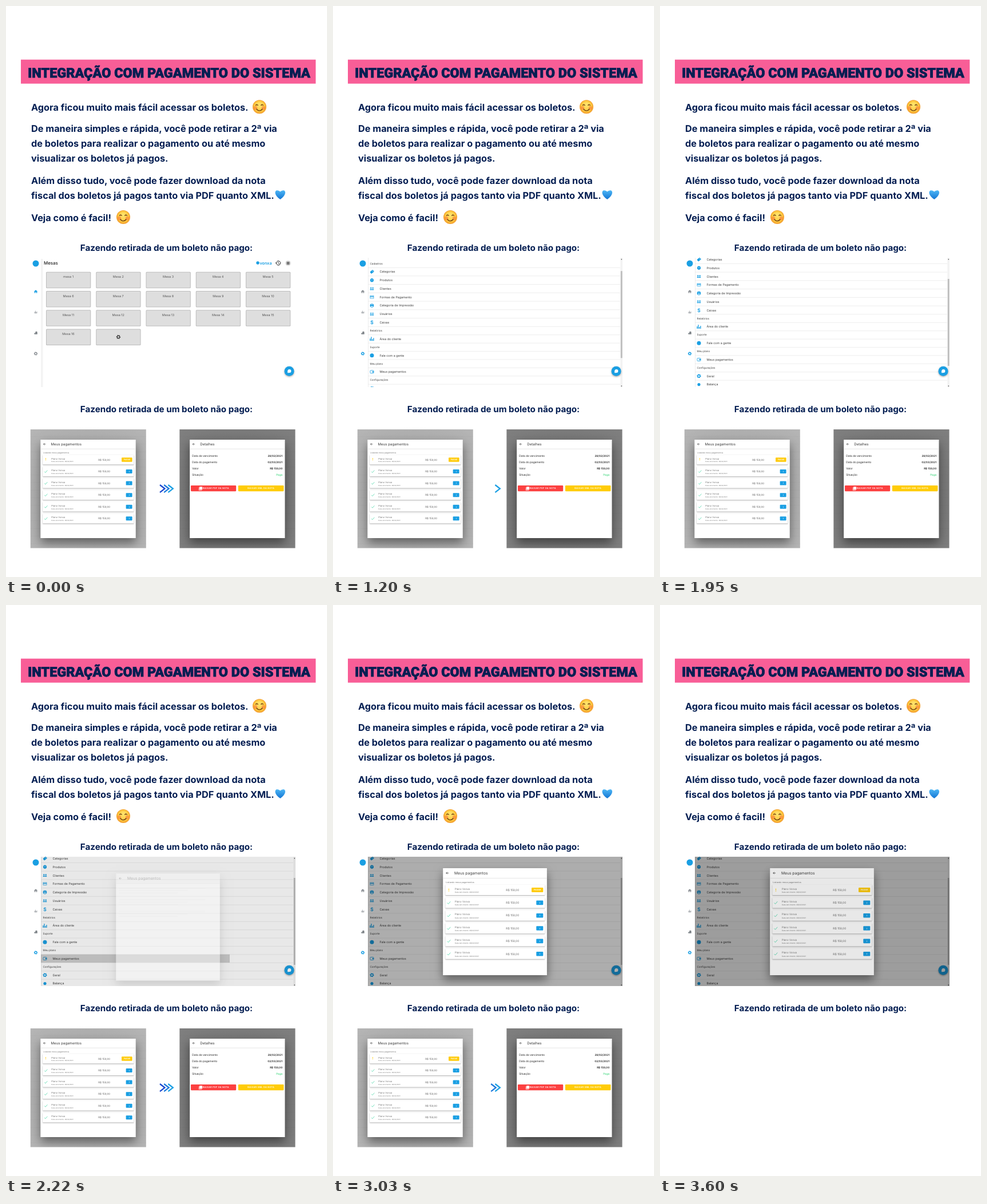
An HTML page with a canvas that plays this animation: 561x998 px, repeating every 3.63 s.

```html
<!DOCTYPE html>
<html lang="pt-BR">
<head>
<meta charset="utf-8">
<title>Integração com pagamento</title>
<style>
html, body { margin: 0; width: 100%; height: 100%; overflow: hidden; background: #fff; }
canvas, svg { position: absolute; left: 0; top: 0; width: 561px; height: 998px; }
text { fill: #041e52; font: 700 16.3px Inter, sans-serif; text-rendering: geometricPrecision; }
.title { font: 900 23.4px Roboto, sans-serif; text-anchor: middle; stroke: #041e52; stroke-width: 0.8px; }
.sub { font-size: 15.2px; text-anchor: middle; }
</style>
</head>
<body>
<canvas id="stage"></canvas>
<svg viewBox="0 0 561 998">
  <rect x="26" y="93.7" width="515.3" height="42" fill="#f85e97"/>
  <text class="title" x="285" y="125">INTEGRAÇÃO COM PAGAMENTO DO SISTEMA</text>
  <text x="44" y="182.5">Agora ficou muito mais fácil acessar os boletos.</text>
  <text x="44" y="219.5">De maneira simples e rápida, você pode retirar a 2ª via</text>
  <text x="44" y="245.5">de boletos para realizar o pagamento ou até mesmo</text>
  <text x="44" y="271.5">visualizar os boletos já pagos.</text>
  <text x="44" y="310.5">Além disso tudo, você pode fazer download da nota</text>
  <text x="44" y="336.5">fiscal dos boletos já pagos tanto via PDF quanto XML.</text>
  <text x="44" y="375.5">Veja como é facil!</text>
  <text class="sub" x="280.5" y="428">Fazendo retirada de um boleto não pago:</text>
  <text class="sub" x="280.5" y="710">Fazendo retirada de um boleto não pago:</text>
</svg>
<script>
const W = 561, H = 998, LOOP = 3630;
const BLUE = '#1a9fe3', INK = '#3a3a3a', GRAY = '#777', YELLOW = '#ffcb0b';
const canvas = document.getElementById('stage');
const c = canvas.getContext('2d');
const dpr = window.devicePixelRatio || 1;
canvas.width = W * dpr;
canvas.height = H * dpr;

const clamp = v => Math.max(0, Math.min(1, v));
const ramp = (t, from, to) => clamp((t - from) / (to - from));
const easeOut = p => 1 - (1 - p) ** 3;

// ---- drawing helpers ----
function group(draw) { c.save(); draw(); c.restore(); }

function rect(x, y, w, h, fill, r = 0) {
  c.fillStyle = fill;
  c.beginPath();
  c.roundRect(x, y, w, h, r);
  c.fill();
}

function dot(x, y, r, fill) {
  c.fillStyle = fill;
  c.beginPath();
  c.arc(x, y, r, 0, 7);
  c.fill();
}

function line(points, color, width = 1) {
  c.strokeStyle = color;
  c.lineWidth = width;
  c.beginPath();
  points.forEach(([x, y]) => c.lineTo(x, y));
  c.stroke();
}

function arc(x, y, r, a, b, color, width) {
  c.strokeStyle = color;
  c.lineWidth = width;
  c.beginPath();
  c.arc(x, y, r, a, b);
  c.stroke();
}

// y is the middle of the capitals
function label(s, x, y, size, color = INK, weight = 400, align = 'left') {
  c.font = `${weight} ${size}px Inter, sans-serif`;
  c.textAlign = align;
  c.fillStyle = color;
  c.fillText(s, x, y + size * 0.36);
}

function shadow(color, blur, dy) {
  c.shadowColor = color;
  c.shadowBlur = blur * dpr;
  c.shadowOffsetY = dy * dpr;
}

// ---- icons, centred on x, y ----
function gear(x, y, r, color) {
  c.fillStyle = color;
  c.beginPath();
  for (let i = 0; i < 24; i++) {
    const a = i * Math.PI / 12, d = i % 4 < 2 ? r : r * 0.76;
    c.lineTo(x + d * Math.cos(a), y + d * Math.sin(a));
  }
  c.closePath();
  c.moveTo(x + r * 0.38, y);
  c.arc(x, y, r * 0.38, 0, 7);
  c.fill('evenodd');
}

function home(x, y, color) {
  c.fillStyle = color;
  c.beginPath();
  [[-3.3, 0.3], [0, -2.8], [3.3, 0.3], [2.3, 0.3], [2.3, 2.8], [0.7, 2.8], [0.7, 0.8],
   [-0.7, 0.8], [-0.7, 2.8], [-2.3, 2.8], [-2.3, 0.3]].forEach(([a, b]) => c.lineTo(x + a, y + b));
  c.fill();
}

function bars(x, y, s, color) {
  [4, 7, 3, 5].forEach((h, i) => rect(x + (i * 2 - 3.7) * s, y + (3.5 - h) * s, 1.3 * s, h * s, color));
}

function people(x, y) {
  for (const dx of [-1.7, 1.7]) {
    dot(x + dx, y - 1.2, 1.2, BLUE);
    rect(x + dx - 1.7, y + 0.6, 3.3, 1.9, BLUE, 0.8);
  }
}

function card(x, y) {
  c.strokeStyle = BLUE;
  c.lineWidth = 0.7;
  c.strokeRect(x - 3, y - 2.3, 6, 4.6);
  rect(x - 3, y - 1.3, 6, 1.3, BLUE);
}

function tag(x, y) {
  group(() => {
    c.translate(x, y);
    c.rotate(-0.7);
    rect(-3, -2, 6.4, 4.2, BLUE, 1);
    dot(1.8, 0, 0.6, '#fff');
  });
}

function cube(x, y) {
  c.fillStyle = BLUE;
  c.beginPath();
  for (let i = 0; i < 6; i++) {
    const a = Math.PI / 6 + i * Math.PI / 3;
    c.lineTo(x + 3.5 * Math.cos(a), y + 3.5 * Math.sin(a));
  }
  c.fill();
  line([[x - 2, y - 1], [x, y], [x + 2, y - 1]], '#fff', 0.5);
}

function printer(x, y) {
  dot(x, y, 3.3, BLUE);
  rect(x - 1.6, y + 0.6, 3.2, 1.6, '#fff');
  rect(x - 1.6, y - 2.2, 3.2, 0.7, '#fff');
}

function wallet(x, y) {
  c.strokeStyle = BLUE;
  c.lineWidth = 0.8;
  c.beginPath();
  c.roundRect(x - 3, y - 2.5, 6, 5, 1);
  c.stroke();
  rect(x + 0.5, y - 1, 2.8, 2, BLUE);
}

function back(x, y) {
  line([[x + 2.2, y], [x - 2, y]], '#333', 0.7);
  line([[x, y - 2], [x - 2, y], [x, y + 2]], '#333', 0.7);
}

function smiley(x, y) {
  const g = c.createRadialGradient(x, y - 4, 2, x, y, 12);
  g.addColorStop(0, '#ffe26a');
  g.addColorStop(0.7, '#fdc93f');
  g.addColorStop(1, '#f2992b');
  dot(x, y, 12, g);
  for (const s of [-1, 1]) {
    dot(x + s * 7, y + 2, 3.2, 'rgba(250,110,60,.5)');
    arc(x + s * 4.6, y - 1.6, 2.1, Math.PI * 1.1, Math.PI * 1.9, '#6b3a12', 1.4);
  }
  arc(x, y + 0.8, 5.8, 0.45, Math.PI - 0.45, '#6b3a12', 1.4);
}

function heart(x, y) {
  const g = c.createLinearGradient(0, y - 8, 0, y + 8);
  g.addColorStop(0, '#4fb9f7');
  g.addColorStop(1, '#1577d4');
  c.fillStyle = g;
  c.beginPath();
  c.moveTo(x, y + 8.5);
  c.bezierCurveTo(x - 14, y - 1, x - 9, y - 12, x, y - 5);
  c.bezierCurveTo(x + 9, y - 12, x + 14, y - 1, x, y + 8.5);
  c.fill();
}

// ---- app screens ----
function sidebar(t) {
  const onMenu = t >= 1110;
  dot(52, 450, 5.5, BLUE);
  home(52, 499, onMenu ? '#8a8f94' : BLUE);
  bars(52, 535, 0.65, '#8a8f94');
  rect(49.2, 571.5, 5.8, 2.2, '#7d8388', 1);
  dot(53, 570.5, 1.8, '#7d8388');
  gear(52, 607.5, 3.3, onMenu ? BLUE : t < 360 ? '#8a8f94' : '#cfd3d6');
}

function tables() {
  rect(61, 442, 3.5, 224, '#f3f3f3');
  label('Mesas', 66, 449.5, 7.9, '#222', 500);
  dot(440, 449, 2.7, BLUE);
  label('vonxa', 443.5, 449, 7.2, BLUE, 600);
  arc(476, 449.3, 3.7, -2.6, 2.6, '#222', 1);
  line([[476, 447], [476, 449.6], [478, 450.6]], '#222', 0.8);
  c.fillStyle = '#222';
  c.beginPath();
  c.moveTo(470.5, 448.5);
  c.lineTo(474.3, 448.5);
  c.lineTo(472.4, 450.8);
  c.fill();
  dot(493, 449.5, 4.8, '#dcdcdc');
  rect(490.5, 447, 5, 5, '#777', 0.8);
  for (let i = 0; i < 17; i++) {
    const x = 70 + (i % 5) * 87.25, y = 464.7 + Math.floor(i / 5) * 33.25;
    rect(x, y, 78.3, 28.5, '#bdbdbd', 1.5);
    rect(x + 1, y + 1, 76.3, 26.5, '#dedede', 1);
    if (i < 16) label(`${i ? 'M' : 'm'}esa ${i + 1}`, x + 39, y + 8.7, 5.5, '#555', 400, 'center');
    else gear(x + 39.2, y + 14, 3.8, '#444');
  }
}

const menu = [
  ['Cadastros'], ['Categorias', tag], ['Produtos', cube], ['Clientes', people],
  ['Formas de Pagamento', card], ['Categoria de Impressão', printer], ['Usuários', people],
  ['Caixas', (x, y) => label('$', x, y, 8.5, BLUE, 600, 'center')],
  ['Relatórios'], ['Área do cliente', (x, y) => bars(x, y, 1, BLUE)],
  ['Suporte'], ['Fale com a gente', (x, y) => dot(x, y, 3.5, BLUE)],
  ['Meu plano'], ['Meus pagamentos', wallet],
  ['Configurações'], ['Geral', (x, y) => gear(x, y, 3.7, BLUE)],
  ['Balança', (x, y) => dot(x, y, 2.6, BLUE)]
];

function menuPage(t) {
  const scroll = 48.3 * easeOut(ramp(t, 1080, 1590));
  rect(61, 440, 445, 226, '#fff');
  rect(61, 440, 1.2, 226, '#efefef');
  group(() => {
    c.translate(0, -scroll);
    dot(75.5, 453.7, 9.8, '#12b5e4');
    label('#1730', 496, 447, 5.7, INK, 400, 'right');
    label('Dom Tarvelo', 478.5, 447, 5.7, INK, 600, 'right');
    label('00.123.456/0001-00', 496, 453, 4.7, '#555', 400, 'right');
    label('Logado como Usuário', 496, 459.2, 3.8, '#444', 600, 'right');
    let y = 477;
    menu.forEach(([name, icon], i) => {
      if (i) y += icon && menu[i - 1][1] ? 14.75 : 14.4;
      line([[61, y + 7.3], [502, y + 7.3]], '#e5e5e5', 0.7);
      if (icon) {
        icon(68, y);
        label(name, 81.5, y, 5.3);
      } else {
        label(name, 64.5, y, 4.6);
      }
      if (name === 'Meus pagamentos' && t > 2130 && t < 2610) {
        const right = Math.min(502, 118 + (t - 2130) * 3);
        rect(61, y - 7.3, right - 61, 14.4, `rgba(0,0,0,${0.22 * (1 - ramp(t, 2180, 2480))})`);
      }
    });
  });
  rect(502.3, 440, 3.7, 226, '#f3f3f3');
  rect(502.8, 446 + scroll * 0.64, 2.8, 152, '#bdbdbd');
  rect(503.6, 442, 1.4, 1.4, '#555');
  rect(503.6, 663.5, 1.4, 1.4, '#555');
}

function fab() {
  group(() => {
    shadow('rgba(0,0,0,.35)', 3, 1.2);
    dot(495, 638.3, 8.5, BLUE);
  });
  dot(495.3, 638, 3.1, '#fff');
  rect(492, 638, 3, 3.2, '#fff', 0.8);
}

// ---- modal contents, drawn from a 0,0 corner ----
function modalFrame(title) {
  // the shadow falls only outside the box, so a fading modal stays clean
  group(() => {
    c.beginPath();
    c.rect(-100, -100, 400, 400);
    c.rect(0, 0, 181.5, 187);
    c.clip('evenodd');
    shadow('rgba(0,0,0,.45)', 16, 8);
    rect(0, 0, 181.5, 187, '#fff');
  });
  rect(0, 0, 181.5, 187, '#fff');
  rect(0, 17.2, 181.5, 0.8, '#dedede');
  back(7.5, 8.5);
  label(title, 19.7, 8.5, 6.7);
}

function payments() {
  label('Listando meus pagamentos', 5, 24.3, 3.8, GRAY);
  for (let i = 0; i < 6; i++) {
    const y = 38 + i * 22.35;
    group(() => {
      shadow('rgba(0,0,0,.32)', 2, 1);
      rect(4, y - 9.2, 174, 18.3, '#fff', 0.8);
    });
    label('Plano Vonxa', 20.5, y - 2, 4.5, GRAY);
    label('Data vencimento: 28/02/2021', 20.5, y + 3.8, 3, GRAY);
    label('R$ 159,00', 110, y, 4.9, '#666');
    if (i) {
      line([[7.2, y + 0.2], [9.2, y + 2.2], [13, y - 2.2]], '#45d6a5', 0.8);
      rect(163, y - 3.8, 12, 7.6, BLUE, 1);
      label('i', 169, y, 4.2, '#fff', 600, 'center');
    } else {
      label('!', 10, y, 7.5, YELLOW, 500, 'center');
      rect(154.7, y - 4, 20.3, 8, YELLOW, 1);
      label('PAGAR', 164.9, y, 3.7, '#fff', 600, 'center');
    }
  }
}

function skeleton() {
  rect(0, 18, 181.5, 169, '#f7f7f7');
  for (let i = 0; i < 9; i++)
    rect(5, 24.6 + Math.floor(i / 3) * 20.4 + (i % 3) * 4.2, [151, 120, 103][i % 3], 1.8, '#e7e7e7');
}

function details() {
  modalFrame('Detalhes');
  const rows = [['Data de vencimento', '28/02/2021'], ['Data do pagamento', '02/03/2021'],
    ['Valor', 'R$ 159,00'], ['Situação', 'Paga']];
  rows.forEach(([name, value], i) => {
    const y = 30.3 + i * 12.2;
    label(name, 4.5, y, 5.2, '#222');
    label(value, 177, y, 5, i < 3 ? '#222' : '#3fd77c', i < 3 ? 600 : 500, 'right');
  });
  rect(2, 87, 86.5, 11, '#fc4040', 1.2);
  rect(92.5, 87, 87, 11, '#ffcc08', 1.2);
  rect(18.5, 89.4, 5.5, 5.5, '#fff', 0.6);
  line([[17.5, 90.6], [17.5, 96], [23, 96]], '#fff', 0.8);
  c.letterSpacing = '0.35px';
  label('BAIXAR PDF DA NOTA', 25, 92.5, 4.1, '#fff', 600);
  label('BAIXAR XML DA NOTA', 136, 92.5, 4.1, '#fff', 600, 'center');
  c.letterSpacing = '0px';
}

function modal(t) {
  const p = ramp(t, 2190, 2300);
  if (!p) return;
  rect(61, 440, 445, 226, `rgba(0,0,0,${0.32 * p})`);
  group(() => {
    c.globalAlpha = p;
    c.translate(192.3, 460 + 13 * (1 - p));
    modalFrame('Meus pagamentos');
    if (t < 2520) skeleton();
    else payments();
  });
  const veil = ramp(t, 3510, 3630) * 0.12;
  if (veil) rect(61, 440, 445, 226, `rgba(0,0,0,${veil})`);
}

function app(t) {
  group(() => {
    c.beginPath();
    c.rect(42, 440, 464.5, 226);
    c.clip();
    sidebar(t);
    const p = ramp(t, 390, 510);
    if (p < 1) tables();
    if (p) group(() => {
      c.globalAlpha = p;
      c.translate(0, 13 * (1 - p));
      menuPage(t);
    });
    fab();
    modal(t);
  });
}

// ---- lower half ----
function panel(x, light, dark, drawModal) {
  group(() => {
    c.beginPath();
    c.rect(x, 740, 202.3, 207.5);
    c.clip();
    const g = c.createRadialGradient(x + 101, 850, 60, x + 101, 850, 150);
    g.addColorStop(0, dark);
    g.addColorStop(1, light);
    rect(x, 740, 203, 208, g);
    for (let y = 752; y < 948; y += 13.4) rect(x, y, 203, 0.6, 'rgba(0,0,0,.04)');
    c.translate(x + 18, 758);
    c.scale(0.915, 0.92);
    drawModal();
  });
}

function chevrons(t) {
  const phase = t % 720;
  const first = phase < 75 ? 0 : phase < 330 ? 1 : phase < 510 ? 2 : 3;
  const colors = ['#1746cf', '#1a78dc', '#1a9fe3'];
  for (let i = first; i < 3; i++) {
    const x = 269 + i * 7.2;
    line([[x, 837], [x + 8.4, 843.6], [x, 850.2]], colors[i], 2.3);
  }
}

function lower(t) {
  if (t >= 3600) return;
  panel(42.5, '#b5b5b5', '#a9a9a9', () => {
    modalFrame('Meus pagamentos');
    payments();
  });
  panel(303.2, '#7f7f7f', '#747474', details);
  chevrons(t);
}

function frame(now) {
  const t = now % LOOP;
  c.setTransform(dpr, 0, 0, dpr, 0, 0);
  c.textRendering = 'geometricPrecision';
  rect(0, 0, W, H, '#fff');
  smiley(443, 176.3);
  smiley(205, 369);
  heart(479.3, 329.5);
  app(t);
  lower(t);
}

const start = performance.now();
(function tick() {
  frame(performance.now() - start);
  requestAnimationFrame(tick);
})();
</script>
</body>
</html>
```
